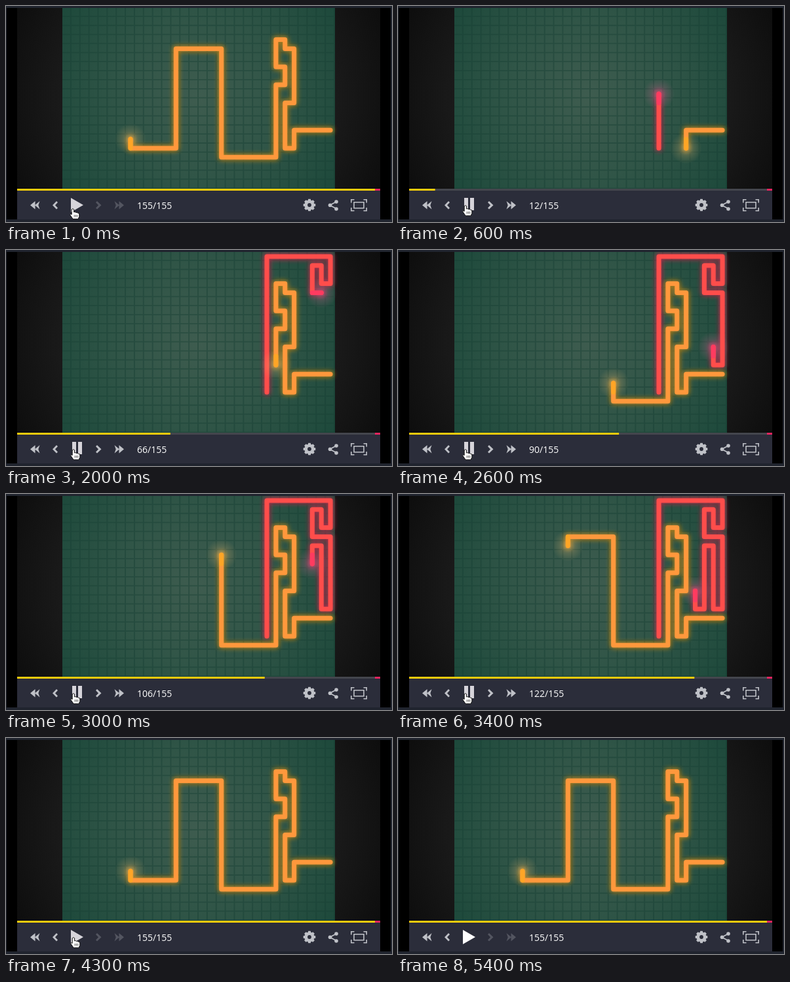
An HTML page that plays this animation: 589 by 331 pixels, repeating every 5.7 s.

```html
<!DOCTYPE html>
<html lang="en">
<head>
<meta charset="utf-8">
<title>Replay player</title>
<style>
  html, body { margin: 0; width: 100%; height: 100%; overflow: hidden; background: #20242e; }
  svg { display: block; width: 589px; height: 331px; }
  text { font: 14px "Open Sans", "Noto Sans", sans-serif; fill: #fff; }
  .trail path { fill: none; stroke-linecap: round; stroke-linejoin: round; stroke-width: 7; }
  .trail .glow { stroke-width: 10; opacity: .68; }
</style>
</head>
<body>
<svg viewBox="0 0 589 331">
  <defs>
    <radialGradient id="room" gradientUnits="userSpaceOnUse" cx="294" cy="141" r="320">
      <stop offset="0" stop-color="#303030"/><stop offset=".65" stop-color="#1a1a1a"/><stop offset="1" stop-color="#0c0c0c"/>
    </radialGradient>
    <radialGradient id="field" gradientUnits="userSpaceOnUse" cx="294" cy="141" r="250">
      <stop offset="0" stop-color="#3e5c4f"/><stop offset=".5" stop-color="#305547"/><stop offset="1" stop-color="#1d493b"/>
    </radialGradient>
    <radialGradient id="amberHalo">
      <stop offset="0" stop-color="#ffc46b" stop-opacity=".5"/><stop offset=".45" stop-color="#f3bd70" stop-opacity=".2"/><stop offset="1" stop-color="#e6b870" stop-opacity="0"/>
    </radialGradient>
    <radialGradient id="pinkHalo">
      <stop offset="0" stop-color="#ff4f92" stop-opacity=".5"/><stop offset=".45" stop-color="#e9689c" stop-opacity=".2"/><stop offset="1" stop-color="#d8709c" stop-opacity="0"/>
    </radialGradient>
    <filter id="blur" filterUnits="userSpaceOnUse" x="0" y="-30" width="589" height="350"><feGaussianBlur stdDeviation="3.6"/></filter>
    <clipPath id="view"><path d="M17 3H571V280H17Z"/></clipPath>
  </defs>

  <path fill="#000" d="M1 3H587V327H1Z"/>
  <path fill="url(#room)" d="M17 3H571V280H17Z"/>
  <path fill="url(#field)" d="M86 3H502V280H86Z"/>
  <path id="grid" fill="none" stroke="#173f33" stroke-width="1.8" opacity=".45" transform="translate(-1 -1)"/>
  <g id="trails" clip-path="url(#view)"></g>

  <path fill="#2b2d3a" d="M17 283H571V327H17Z"/>
  <path fill="#44464d" d="M17 280H571V283H17Z"/>
  <rect id="bar" x="17" y="280" height="3" fill="#f2cb0c"/>
  <path fill="#e3245f" d="M563 280H571V283H563Z"/>

  <g fill="#bfc1c7">
    <path d="M44.5 299L37 305.3L44.5 311.5ZM51.5 299L44 305.3L51.5 311.5L49.3 305.3Z"/>
    <path d="M77 299L71 305.3L77 311.5L79 309.5L75 305.3L79 301Z"/>
    <g id="forward">
      <path d="M139 299L145.5 305.3L139 311.5L137 309.5L141 305.3L137 301Z"/>
      <path d="M165.5 299L173 305.3L165.5 311.5L167.7 305.3ZM172.5 299L180 305.3L172.5 311.5Z"/>
    </g>
    <path id="play" d="M99 294L118 305L99 316Z"/>
    <path id="pause" fill="#d6d4da" d="M101 294H107V313H101ZM110 294H116V313H110Z"/>
    <g id="gear" transform="translate(463 305)"><circle r="5.2" fill="none" stroke="#bfc1c7" stroke-width="4.6"/></g>
    <path d="M504 300L494 305.3L504 310.5" fill="none" stroke="#bfc1c7" stroke-width="1.8"/>
    <circle cx="504" cy="300" r="2.8"/><circle cx="494.5" cy="305.3" r="2.8"/><circle cx="504" cy="311" r="2.8"/>
    <path d="M531.5 296.8H526.8V301.5M545.5 296.8H550.2V301.5M526.8 309V313.7H531.5M550.2 309V313.7H545.5M531 300.8H546V309.7H531Z" fill="none" stroke="#bfc1c7" stroke-width="1.6"/>
  </g>
  <text id="count" x="200" y="311"></text>

  <g id="cursor" fill="#fff" stroke="#111" stroke-linejoin="round">
    <g id="hand">
      <path d="M-1.8 1.2Q0-1 1.6 1.2V5.4Q3.4 4.4 4.6 6Q6.4 5.2 7.5 6.8Q9.6 6.4 9.8 8.5V12L8.2 15.8H0L-4.2 9.6Q-4.4 7.2-1.8 9Z"/>
      <path d="M2.3 9.5V13M4.5 9.5V13M6.7 9.5V13" stroke-width=".7"/>
    </g>
    <path id="arrow" d="M0 0V16L3.7 12.5L6.4 18.5L9 17.4L6.4 11.6H11.5Z"/>
  </g>
</svg>
<script>
const LOOP = 5700, STEP = 100, LAST = 155;
const CELL = 416 / 30, LEFT = 86, TOP = 3;
const $ = id => document.getElementById(id);
const px = ([c, r]) => [LEFT + (c + .5) * CELL, TOP + (r + .5) * CELL];
const line = cells => "M" + cells.map(c => px(c).map(v => v.toFixed(2)).join(" ")).join("L");
const show = (el, on) => el.setAttribute("display", on ? "inline" : "none");

function add(parent, tag, attrs) {
  const el = document.createElementNS("http://www.w3.org/2000/svg", tag);
  for (const key in attrs) el.setAttribute(key, attrs[key]);
  return parent.appendChild(el);
}

// Expands a route such as "u3l2" into the list of visited cells.
function route(start, moves) {
  const dirs = { u: [0, -1], d: [0, 1], l: [-1, 0], r: [1, 0] };
  const cells = [start];
  for (const [, way, count] of moves.matchAll(/([udlr])(\d+)/g))
    for (let i = 0; i < count; i++) {
      const [c, r] = cells[cells.length - 1];
      cells.push([c + dirs[way][0], r + dirs[way][1]]);
    }
  return cells;
}

function rider(cells, colors, halo) {
  const group = add($("trails"), "g", { class: "trail" });
  const glow = add(group, "path", { class: "glow", stroke: colors.glow, filter: "url(#blur)" });
  const light = add(group, "circle", { r: 24, fill: `url(#${halo})` });
  const body = add(group, "path", { stroke: colors.body });
  const tip = add(group, "path", { stroke: colors.tip });
  return (moves, alive) => {
    show(group, alive);
    const trail = cells.slice(0, moves + 1);
    const [x, y] = px(trail[trail.length - 1]);
    glow.setAttribute("d", line(trail));
    body.setAttribute("d", line(trail));
    tip.setAttribute("d", line(trail.slice(-2)));
    light.setAttribute("cx", x);
    light.setAttribute("cy", y);
  };
}

const red = rider(
  route([22, 15], "u15r7d3l1u2l1d3r2d8l1u7l1d7l1u11l3d1r2d1"),
  { body: "#ff4d4b", tip: "#ff3b60", glow: "#ee234f" }, "pinkHalo");
const orange = rider(
  route([29, 13], "l4d2l1u5r1u6l1u1l1d3r1d2l1d8l6u12l5d11l5u1"),
  { body: "#ff983c", tip: "#ffa526", glow: "#ef9510" }, "amberHalo");

let grid = "";
for (let i = 1; i <= 30; i++) grid += `M${LEFT + i * CELL} 4V281`;
for (let i = 1; i <= 20; i++) grid += `M87 ${TOP + i * CELL}H503`;
$("grid").setAttribute("d", grid);
for (let i = 0; i < 8; i++)
  add($("gear"), "path", { d: "M-2.6-6L-1.8-9.3H1.8L2.6-6Z", transform: `rotate(${i * 45})` });

function turnAt(t) {
  if (t < 400) return LAST;
  const k = Math.floor((t - 300) / STEP);
  return Math.min(LAST, 4 * k - (t >= 1900 ? 2 : 0));
}

function drawCursor(t) {
  const leave = t < 4800 ? 0 : Math.min(1, (Math.floor((t - 4800) / STEP) + 1) / 6);
  const eased = Math.pow(leave, 1.3);
  const [x, y] = t < 400 ? [102, 310.5] : [103 + 176 * eased, 305.5 - 317.5 * eased];
  $("cursor").setAttribute("transform", `translate(${x} ${y})`);
  show($("cursor"), t < 5400);
  show($("hand"), !leave);
  show($("arrow"), leave > 0);
  $("play").setAttribute("fill", leave ? "#fff" : "#d6d4da");
}

function draw(t) {
  const turn = turnAt(t), ended = turn === LAST;
  const moves = Math.floor(turn / 2);
  red(moves, !ended);
  orange(moves, true);
  $("bar").setAttribute("width", 554 * (turn - 1) / (LAST - 1));
  $("count").textContent = `${turn}/${LAST}`;
  $("forward").setAttribute("fill", ended ? "#535560" : "#bfc1c7");
  show($("play"), ended);
  show($("pause"), !ended);
  drawCursor(t);
}

const begin = performance.now();
function tick() {
  draw((performance.now() - begin) % LOOP);
  requestAnimationFrame(tick);
}
tick();
</script>
</body>
</html>
```
